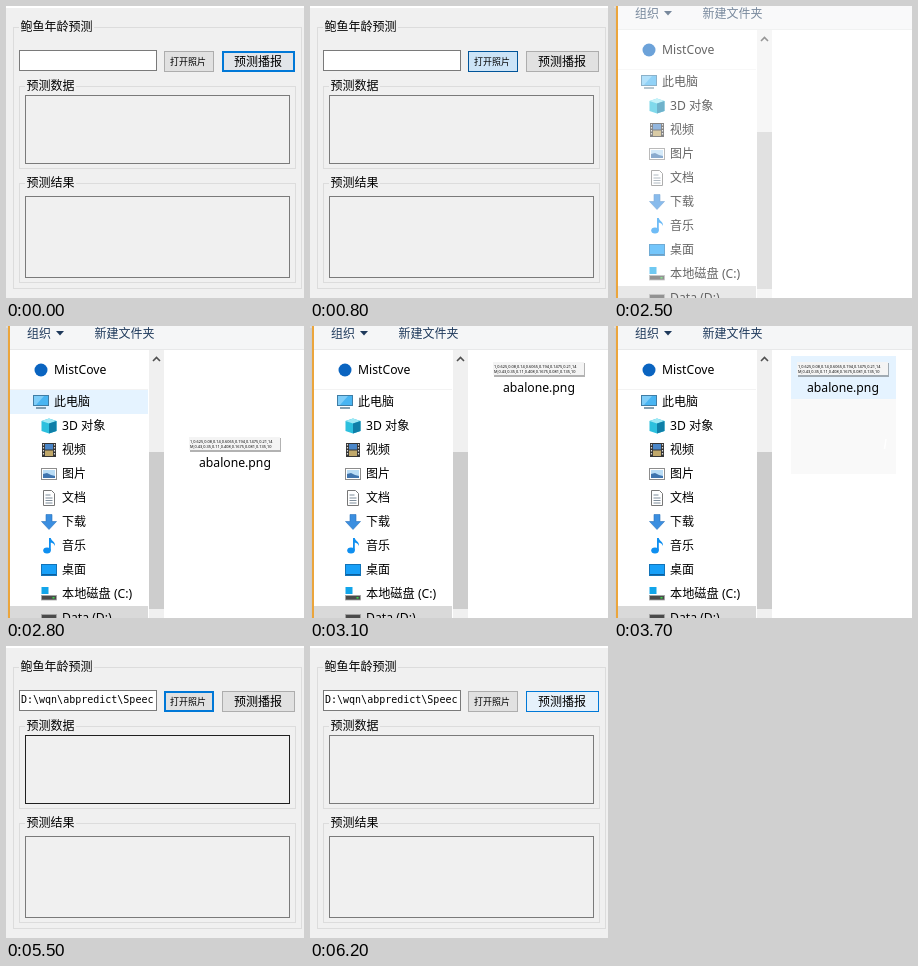
An HTML page that plays this animation: 298x292 px, repeating every 8 s.

```html
<!DOCTYPE html>
<html lang="zh-CN">
<head>
<meta charset="utf-8">
<title>鲍鱼年龄预测</title>
<style>
html, body { margin: 0; width: 100%; height: 100%; overflow: hidden; background: #f0f0f0; }
svg { display: block; }
text { font: 12px "Noto Sans CJK SC", "Noto Sans CJK", sans-serif; fill: #000; }
.latin { font: 12.2px "Noto Sans", "Noto Sans CJK SC", "Noto Sans CJK", sans-serif; }
.small { font-size: 9px; }
.path { font: 10px "DejaVu Sans Mono", monospace; white-space: pre; }
.tiny { font: 500 3.9px "Noto Sans", sans-serif; fill: #000; }
.bar text { fill: #1e395b; }
.group { fill: none; stroke: #dcdcdc; }
.gap { fill: #f0f0f0; }
.box { fill: #f0f0f0; stroke: #7a7a7a; }
.btn { fill: #e1e1e1; stroke: #adadad; }
.ring { fill: none; stroke: #0078d7; }

/* Hard steps on one shared 8 s clock: 1.25% is 100 ms. */
.a { animation: 8s step-end infinite; }
.open { animation-name: open; }
.open-ring { animation-name: open-ring; }
.play { animation-name: play; }
.play-ring { animation-name: play-ring; }
.data { animation-name: data; }
.path { animation-name: path; }
.dialog { animation-name: dialog; }
.content { animation-name: content; }
.file { animation-name: file; }
.pc { animation-name: pc; }
.tile { animation-name: tile; }
.veil { animation-name: veil; }

@keyframes open {
  0% { fill: #e1e1e1; stroke: #adadad; }
  7.5% { fill: #e3eaf0; stroke: #5a96c4; }
  8.75% { fill: #e5f1fb; stroke: #0078d7; }
  10% { fill: #cce4f7; stroke: #005499; }
  11.25% { fill: #e5f1fb; stroke: #0078d7; }
  62.5% { fill: #e1e1e1; stroke: #0078d7; }
  75%, 100% { fill: #e1e1e1; stroke: #adadad; }
}
@keyframes open-ring {
  0% { opacity: 0; }
  62.5% { opacity: 1; }
  75%, 100% { opacity: 0; }
}
@keyframes play {
  0% { fill: #e2e5e9; stroke: #0078d7; }
  2.5% { fill: #e1e1e1; stroke: #0078d7; }
  10% { fill: #e1e1e1; stroke: #adadad; }
  71.25% { fill: #e3eaf0; stroke: #5a96c4; }
  72.5% { fill: #e5f1fb; stroke: #0078d7; }
  75% { fill: #cce4f7; stroke: #005499; }
  76.25% { fill: #d9ebf9; stroke: #0066b4; }
  77.5%, 100% { fill: #e5f1fb; stroke: #0078d7; }
}
@keyframes play-ring {
  0% { opacity: 1; }
  10%, 100% { opacity: 0; }
}
@keyframes data {
  0% { stroke: #7a7a7a; }
  67.5% { stroke: #484848; }
  68.75% { stroke: #1f1f1f; }
  71.25% { stroke: #3c3c3c; }
  72.5% { stroke: #5c5c5c; }
  75%, 100% { stroke: #7a7a7a; }
}
@keyframes path {
  0% { opacity: 0; }
  67.5%, 100% { opacity: 1; }
}
@keyframes dialog {
  0% { opacity: 0; transform: none; }
  22.5% { opacity: .42; transform: translateX(9px); }
  23.75% { opacity: .8; transform: translateX(4px); }
  25% { opacity: 1; transform: none; }
  62.5% { opacity: .6; transform: translateX(3px); }
  63.75% { opacity: .25; transform: translateX(7px); }
  65%, 100% { opacity: 0; transform: none; }
}
@keyframes content {
  0% { opacity: 0; }
  31.25% { opacity: .6; }
  32.5%, 100% { opacity: 1; }
}
@keyframes file {
  0% { opacity: 0; transform: none; }
  33.75% { opacity: 1; transform: none; }
  38.75%, 100% { opacity: 1; transform: translateY(-75px); }
}
@keyframes pc {
  0% { opacity: 0; }
  35% { opacity: 1; }
  38.75%, 100% { opacity: 0; }
}
@keyframes tile {
  0% { fill: #fff; }
  46.25% { fill: #e5f3ff; }
  50% { fill: #cce8ff; }
  61.25%, 100% { fill: #d9d9d9; }
}
@keyframes veil {
  0% { opacity: 0; }
  40%, 100% { opacity: 1; }
}
</style>
</head>
<body>
<svg width="298" height="292" viewBox="0 0 298 292">
  <defs>
    <linearGradient id="shade">
      <stop offset="0" stop-opacity="0"/>
      <stop offset="1" stop-opacity=".16"/>
    </linearGradient>
    <clipPath id="field"><rect x="14" y="45" width="136" height="19"/></clipPath>
  </defs>

  <!-- Main window -->
  <rect width="298" height="292" fill="#f0f0f0"/>
  <rect width="298" height="2" fill="#fff"/>
  <rect class="group" x="7.5" y="21.5" width="288" height="261"/>
  <rect class="group" x="13.5" y="80.5" width="276" height="82"/>
  <rect class="group" x="13.5" y="177.5" width="276" height="99"/>
  <rect class="gap" x="13" y="14" width="75" height="14"/>
  <rect class="gap" x="19" y="74" width="51" height="13"/>
  <rect class="gap" x="19" y="170" width="51" height="13"/>
  <text x="14.5" y="24.5">鲍鱼年龄预测</text>
  <text x="20.5" y="84">预测数据</text>
  <text x="20.5" y="181">预测结果</text>

  <rect x="13.5" y="44.5" width="137" height="20" fill="#fff" stroke="#7a7a7a"/>
  <g clip-path="url(#field)"><text class="path a" x="15" y="57">D:\wqn\abpredict\Speec</text></g>

  <rect class="btn open a" x="158.5" y="45.5" width="49" height="20"/>
  <rect class="ring open-ring a" x="159.5" y="46.5" width="47" height="18"/>
  <text class="small" x="164" y="59">打开照片</text>
  <rect class="btn play a" x="216.5" y="45.5" width="72" height="20"/>
  <rect class="ring play-ring a" x="217.5" y="46.5" width="70" height="18"/>
  <text x="228" y="60">预测播报</text>

  <rect class="box data a" x="19.5" y="89.5" width="264" height="68"/>
  <rect class="box" x="19.5" y="190.5" width="264" height="81"/>

  <!-- File dialog -->
  <g class="dialog a">
    <rect x="-12" width="15" height="292" fill="url(#shade)"/>
    <rect x="3" width="296" height="292" fill="#fff"/>
    <rect x="2" width="2" height="292" fill="#eba53c"/>

    <g class="content a">
      <g class="bar">
        <rect x="4" width="294" height="23" fill="#f5f6f7"/>
        <rect x="4" y="23" width="294" height="1" fill="#e8e9ea"/>
        <text x="21" y="12">组织</text>
        <path d="M50 5h8l-4 4.500z" fill="#1e395b"/>
        <text x="88.500" y="12">新建文件夹</text>
      </g>

      <rect x="143" y="24" width="15" height="268" fill="#f0f0f0"/>
      <rect x="143" y="126" width="15" height="157" fill="#cdcdcd"/>
      <path d="M147 35l3.500-3.500 3.500 3.500" fill="none" stroke="#505050" stroke-width="1.600"/>
      <rect x="4" y="63" width="138" height="1" fill="#f3f3f3"/>
      <rect class="pc a" x="4" y="64" width="138" height="24" fill="#e5f3ff"/>
      <rect x="4" y="280" width="138" height="12" fill="#d9d9d9"/>

      <g class="icons">
        <circle cx="35" cy="44" r="6.500" fill="#0a64c0"/>
        <g transform="translate(35 76)">
          <rect x="-7.500" y="-6.500" width="15" height="10" fill="#49b5f2" stroke="#3f7da5"/>
          <path d="M-7-6h10l-8 9h-2z" fill="#7fcdf8"/>
          <path d="M-5 6h10" stroke="#5d7f94" stroke-width="1.500"/>
        </g>
        <g transform="translate(43 100)">
          <path d="M-7.500-5L0-7.500 7.500-5v10L0 7.500-7.500 5z" fill="#2cc0de"/>
          <path d="M-7.500-5L0-7.500 7.500-5 0-2.500z" fill="#9ee9f5"/>
          <path d="M0-2.500L7.500-5v10L0 7.500z" fill="#0f7fa8"/>
        </g>
        <g transform="translate(43 124)">
          <rect x="-7" y="-7" width="14" height="14" fill="#343434"/>
          <rect x="-4" y="-6" width="8" height="5.500" fill="#4a86c8"/>
          <rect x="-4" y=".5" width="8" height="5.500" fill="#c0a86a"/>
          <path d="M-5.500-6v12M5.500-6v12" stroke="#ddd" stroke-width="1.200" stroke-dasharray="1.500 1.500"/>
        </g>
        <g transform="translate(43 148)">
          <rect x="-7.500" y="-5.500" width="15" height="11" fill="#fff" stroke="#8c8c8c"/>
          <rect x="-6" y="-4" width="12" height="8" fill="#b9dcf5"/>
          <path d="M-6 4v-4l4-1 4 2 4 1v2z" fill="#3f74ae"/>
        </g>
        <g transform="translate(43 172)">
          <path d="M-5.500-7.500h8l3 3v12h-11z" fill="#fff" stroke="#777"/>
          <path d="M-3.500-3h5M-3.500 0h7M-3.500 2.500h7M-3.500 5h7" stroke="#7d8c9a"/>
        </g>
        <path transform="translate(43 196)" d="M-3-7.500h6v7h4.500L0 7.500-7.500-.5H-3z" fill="#3a8ee0" stroke="#2a72bd" stroke-width=".6"/>
        <g transform="translate(43 220)" fill="#0f8ff0">
          <ellipse cx="-2" cy="4.500" rx="3.800" ry="3"/>
          <path d="M0-8h1.800c.5 3 4.700 3.500 4.200 8-1-2.500-2.500-3-4.200-3.500v8H0z"/>
        </g>
        <g transform="translate(43 244)">
          <rect x="-7.500" y="-5.500" width="15" height="11" fill="#18a0f8" stroke="#1273b8"/>
          <path d="M-7 4.500h14" stroke="#0b5f9e"/>
        </g>
        <g transform="translate(43 268)">
          <rect x="-7.500" y="1.500" width="15" height="4.500" fill="#4a4a4a" stroke="#a5a5a5" stroke-width=".8"/>
          <rect x="3.500" y="3" width="2" height="1.500" fill="#38d948"/>
          <rect x="-7.500" y="-7" width="7" height="7" fill="#12a5ea"/>
        </g>
        <rect x="35.500" y="288.500" width="15" height="5" fill="#4a4a4a" stroke="#a5a5a5" stroke-width=".8"/>
      </g>

      <text class="latin" x="48" y="48">MistCove</text>
      <text x="48" y="80">此电脑</text>
      <text class="latin" x="56" y="104">3D 对象</text>
      <text x="56" y="128">视频</text>
      <text x="56" y="152">图片</text>
      <text x="56" y="176">文档</text>
      <text x="56" y="200">下载</text>
      <text x="56" y="224">音乐</text>
      <text x="56" y="248">桌面</text>
      <text class="latin" x="56" y="272">本地磁盘 (C:)</text>
      <text class="latin" x="56" y="296">Data (D:)</text>

      <g class="veil a">
        <rect x="177" y="73" width="105" height="75" fill="#f9f9f9"/>
        <path d="M272 113l-1.500 10" stroke="#fff" stroke-width="1.500"/>
      </g>
      <g class="file a">
        <rect class="tile a" x="177" y="105" width="105" height="43"/>
        <rect x="184" y="112" width="91" height="14" fill="#000" opacity=".3"/>
        <rect x="183" y="111" width="91" height="13" fill="#f4f4f4"/>
        <text class="tiny" x="184" y="116.500">1,0.625,0.08,0.14,0.6065,0.194,0.1475,0.21,14</text>
        <text class="tiny" x="184" y="122">M,0.43,0.35,0.11,0.408,0.1675,0.081,0.135,10</text>
        <text class="latin" x="193" y="141">abalone.png</text>
      </g>
    </g>
  </g>
</svg>
</body>
</html>
```
